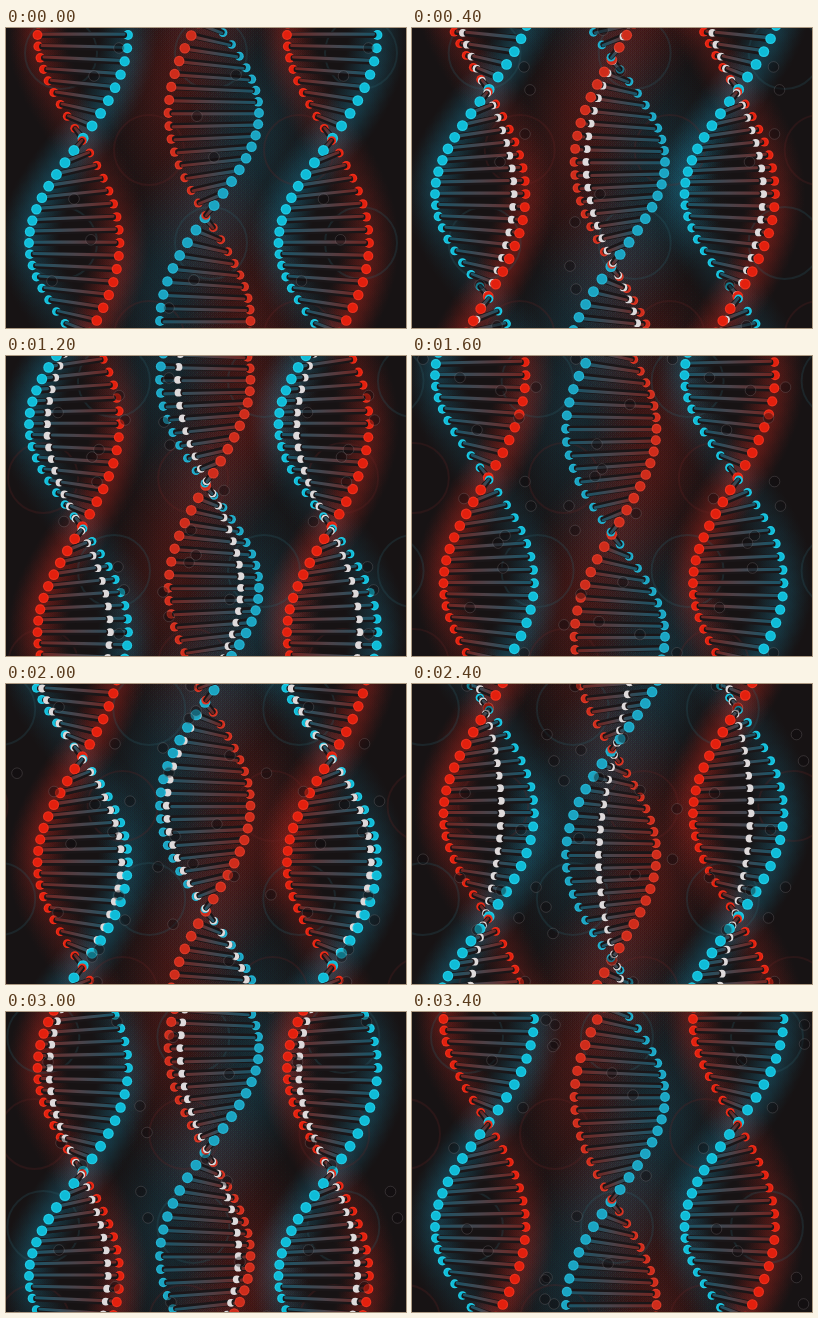
An HTML page with a canvas for the animation above (3.6 s loop, 400 px wide and 300 px high).

```html
<!DOCTYPE html>
<html>
<head>
<meta charset="utf-8">
<title>Turning helices</title>
<style>
html, body { margin: 0; width: 100%; height: 100%; overflow: hidden; background: #171314; }
canvas { display: block; width: 400px; height: 300px; }
</style>
</head>
<body>
<canvas id="stage" width="400" height="300"></canvas>
<script>
const ctx = document.getElementById('stage').getContext('2d');
const TAU = Math.PI * 2;
const LOOP = 3600, STEP = 200, TURN = 3400;
const AXIS = 72.5, PITCH = 416, GAP = PITCH / 34, TOP = 7, TILT = 5.5;
const CYAN = 49.5, RED = -41;
const FALL = 0.215;

const near = { red: ['#ee301c', '#e3200e'], cyan: ['#22cbe6', '#0fbcd8'], reach: 31, power: 1 };
const far = { red: ['#dc3a28', '#cf2c1b'], cyan: ['#25b4d2', '#1ba4c2'], reach: 72, power: 0.28 };

// Left, right and the upside-down middle copy
const copies = [
  { sign: 1, x: 0, y: 0, look: near },
  { sign: 1, x: 249.5, y: 0, look: near },
  { sign: -1, x: 276, y: 300, look: far }
];

// Falling bubbles: x, time of entry at the top edge
const bubbles = [
  [46, -1177], [85, -985], [68, -795], [88, -223], [113, -93], [118, 112],
  [112, 219], [58, 430], [91, 614], [86, 730], [93, 765], [119, 902],
  [52, 937], [113, 1016], [65, 1256], [107, 1312], [89, 1440], [124, 1455],
  [48, 1500], [11, 1585], [109, 1722], [53, 1893], [142, 2042], [135, 2165],
  [76, 2288], [55, 2391], [42, 2767], [111, 2955], [80, 3175], [143, 3251],
  [143, 3340]
];

function disc(x, y, r, fill) {
  ctx.fillStyle = fill;
  ctx.beginPath();
  ctx.arc(x, y, r, 0, TAU);
  ctx.fill();
}

function ring(x, y, r, stroke, width) {
  ctx.strokeStyle = stroke;
  ctx.lineWidth = width;
  ctx.beginPath();
  ctx.arc(x, y, r, 0, TAU);
  ctx.stroke();
}

function at(h, angle, radius) {
  const z = Math.sin(angle) * radius / CYAN;
  return { x: AXIS + Math.cos(angle) * radius, y: h + TILT * z, z };
}

function eachRung(t, draw) {
  for (let k = -7; k < 32; k++) {
    const h = TOP + k * GAP;
    draw(h, TAU * ((h - TOP) / PITCH + t / TURN));
  }
}

function glow(p, rgb, { reach, power }) {
  const a = (0.1 + 0.045 * p.z) * power;
  const g = ctx.createRadialGradient(p.x, p.y, 0, p.x, p.y, reach);
  g.addColorStop(0, `rgba(${rgb},${a * 1.3})`);
  g.addColorStop(0.5, `rgba(${rgb},${a * 0.6})`);
  g.addColorStop(1, `rgba(${rgb},0)`);
  disc(p.x, p.y, reach, g);
}

function glows(t, look) {
  ctx.globalCompositeOperation = 'lighter';
  eachRung(t, (h, a) => {
    glow(at(h, a, RED), '200,22,10', look);
    glow(at(h, a, CYAN), '0,108,140', look);
  });
  ctx.globalCompositeOperation = 'source-over';
}

function capsule(a, b, ra, rb, fill) {
  const dir = Math.atan2(b.y - a.y, b.x - a.x), q = Math.PI / 2;
  ctx.fillStyle = fill;
  ctx.beginPath();
  ctx.arc(a.x, a.y, ra, dir + q, dir - q);
  ctx.arc(b.x, b.y, rb, dir - q, dir + q);
  ctx.fill();
}

// Part of a rung between two radii, lit by the strand colours
function bar(h, angle, from, to) {
  const a = at(h, angle, from), b = at(h, angle, to);
  const r = at(h, angle, RED), c = at(h, angle, CYAN);
  const tint = ctx.createLinearGradient(r.x, r.y, c.x, c.y);
  tint.addColorStop(0, '#74241f');
  tint.addColorStop(0.5, '#49434a');
  tint.addColorStop(1, '#16566a');
  const width = p => 3.1 + 0.4 * p.z;
  capsule(a, b, width(a), width(b), '#1a1618');
  a.y -= 0.9;
  b.y -= 0.9;
  capsule(a, b, width(a) * 0.5, width(b) * 0.5, tint);
}

function dot(p, [rim, core]) {
  const r = 4.9 + 0.6 * p.z;
  disc(p.x, p.y, r, rim);
  disc(p.x, p.y, r - 1.2, core);
}

function helix(t, look) {
  const mix = (1 - Math.cos(TAU * t / TURN)) / 2;
  const band = RED + (CYAN - RED) * mix;
  eachRung(t, (h, a) => {
    const red = () => dot(at(h, a, RED), look.red);
    const cyan = () => dot(at(h, a, CYAN), look.cyan);
    const redFar = Math.sin(a) > 0;
    const side = redFar ? 1 : -1;
    const start = redFar ? RED + 4 : CYAN - 4;
    const end = redFar ? CYAN - 4 : RED + 4;
    (redFar ? red : cyan)();
    bar(h, a, start, end);
    if (mix > 0.02 && mix < 0.98) {
      const p = at(h, a, band);
      disc(p.x, p.y, 3.9, '#dedadb');
      // The nearer half of the rung hides part of the white band
      const cut = band + side * 5;
      if ((end - cut) * side > 0) bar(h, a, cut, end);
    }
    (redFar ? cyan : red)();
  });
}

function drops(t) {
  for (const [x, start] of bubbles) {
    const y = (t - start) * FALL;
    if (y < -6 || y > 306) continue;
    disc(x, y, 5, 'rgba(14,11,12,0.4)');
    ring(x, y, 5.3, 'rgba(115,110,112,0.32)', 1);
  }
}

function hoops(t) {
  const p = t / TURN;
  const row = (y, x0, shift, r, color) => {
    for (let x = x0 + shift; x < 450; x += 150) ring(x, y, r, color, 2);
  };
  for (const y of [25, 215]) row(y, -95, p * 150, 36, 'rgba(45,95,108,0.24)');
  for (const y of [122, 308]) row(y, 143, -p * 300, 35, 'rgba(110,40,38,0.22)');
}

function everywhere(draw, t) {
  for (const { sign, x, y, look } of copies) {
    ctx.setTransform(sign, 0, 0, sign, x, y);
    draw(t, look);
  }
  ctx.setTransform(1, 0, 0, 1, 0, 0);
}

function frame() {
  const t = Math.floor(performance.now() % LOOP / STEP) * STEP;
  ctx.fillStyle = '#171314';
  ctx.fillRect(0, 0, 400, 300);
  everywhere(glows, t);
  hoops(t);
  everywhere(helix, t);
  everywhere(drops, t);
  requestAnimationFrame(frame);
}
frame();
</script>
</body>
</html>
```
